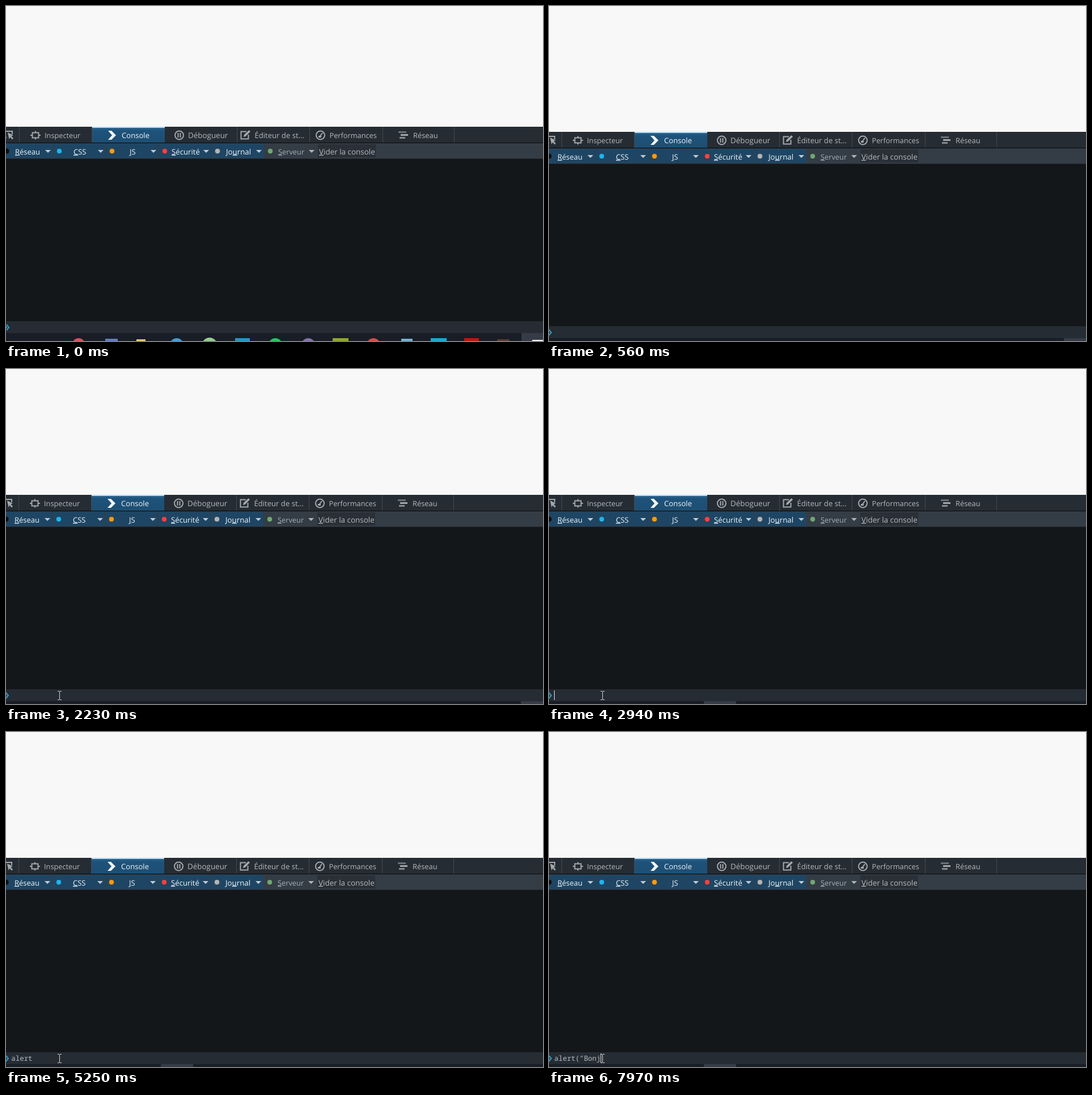
Write an HTML page that moves like this. It is 947 by 591 pixels and loops after 8000 ms.

```html
<!DOCTYPE html>
<html lang="fr">
<head>
<meta charset="utf-8">
<title>Console</title>
<style>
html, body { margin: 0; width: 100%; height: 100%; overflow: hidden; background: #f8f8f8; }
svg { display: block; }
text { font: 13px "Open Sans", "Noto Sans", sans-serif; text-rendering: geometricPrecision; white-space: pre; }
.u { text-decoration: underline; }
#line text { font: 12.417px "Noto Sans Mono", "DejaVu Sans Mono", monospace; }
</style>
</head>
<body>
<svg id="stage" width="947" height="591" viewBox="0 0 947 591">
  <defs>
    <linearGradient id="glow" x1="0" y1="0" x2="0" y2="1">
      <stop offset="0" stop-color="#2a6a96"/>
      <stop offset=".25" stop-color="#1f527a"/>
      <stop offset="1" stop-color="#1d4f73"/>
    </linearGradient>
  </defs>
  <rect width="947" height="591" fill="#f8f8f8"/>
  <g id="panel"></g>
  <rect id="edge" x="946" width="1" height="591" fill="#8b8e91"/>
  <g id="line">
    <text x="9.3" y="580"><tspan id="typed" fill="#b6bcc2"></tspan><tspan id="hint" fill="#6f706b"></tspan></text>
    <rect id="caret" y="567" width="1" height="17" fill="#e4e8ec"/>
  </g>
  <path id="arrow" d="M.5 .5V15.5L4 12.2L6.4 17.5L8.8 16.4L6.5 11.4H11.5Z" fill="#fff" stroke="#000"/>
  <path id="beam" d="M91 568.5H94M95 568.5H98M94.5 569V583M91 583.5H94M95 583.5H98" fill="none" stroke="#d6d8da"/>
</svg>
<script>
const $ = id => document.getElementById(id);
const rect = (x, y, w, h, fill) => `<rect x="${x}" y="${y}" width="${w}" height="${h}" fill="${fill}"/>`;
const path = (d, stroke, width = 2) => `<path d="${d}" fill="none" stroke="${stroke}" stroke-width="${width}"/>`;
const shape = (d, fill) => `<path d="${d}" fill="${fill}"/>`;
const ring = (x, y, r, stroke) => `<circle cx="${x}" cy="${y}" r="${r}" fill="none" stroke="${stroke}" stroke-width="2"/>`;

// "_" marks the underlined letter that follows it
const label = (s, x, y, fill, size = 13) =>
  `<text x="${x}" y="${y}" fill="${fill}" style="font-size:${size}px">` +
  s.replace(/_(.)/, '<tspan class="u">$1</tspan>') + '</text>';

const GREY = '#b4b9be', ICON = '#a3a8ac', WHITE = '#f0f4f7';

function tabs() {
  const names = [['Inspecteur', 67, 12.75], ['Console', 203, 13.1], ['Débogueur', 320, 13.4],
    ['Éditeur de st...', 437.5, 13.1], ['Performances', 569.5, 12.75], ['Réseau', 717, 12.9]];
  return rect(-5, 222, 960, 28, '#252c33') +
    [22, 150, 278, 406, 534, 663, 789].map(x => rect(x, 222, 1, 28, '#42494f')).join('') +
    rect(151, 222, 128, 28, 'url(#glow)') + rect(151, 222, 128, 2, '#b5dcf2') +
    rect(-5, 250, 960, 1, '#07090b') +
    names.map(([s, x, size]) => label(s, x, 241.5, s === 'Console' ? WHITE : GREY, size)).join('');
}

function icons() {
  return path('M-5 230H10V235M-5 241H0', ICON) +
    shape('M2 232L12 237L8.5 238.5L12 242.5L10 244.5L6.5 240.5L4.5 244Z', ICON) +
    path('M45.5 232.5H56.5V241.5H45.5ZM51 229.5V232M51 242V244.5M42 237H45M57 237H60', ICON) +
    shape('M179 229H185L193 237L185 245H179L186 237Z', WHITE) +
    ring(304.5, 237, 7.5, ICON) + path('M302.5 233V241M306.5 233V241', ICON) +
    path('M423 230.5H413.5V243.5H426.5V236', ICON) +
    shape('M418 240L419 236L427.5 228L430 230.5L421.5 239Z', ICON) +
    ring(553.5, 237, 7.5, ICON) + path('M552.5 239L557 233', ICON) +
    shape('M550 238H555V241H550Z', ICON) +
    rect(691, 230, 14, 3, '#6a7076') + rect(695, 235, 13, 3, ICON) + rect(693, 240, 10, 3, '#858b90');
}

function filters() {
  const items = [['_Réseau', 15, '#0b0d0f'], ['_CSS', 118, '#1cb4ee'], ['_JS', 217, '#f59a14'],
    ['_Sécurité', 291, '#ee4345', 13.2], ['Jo_urnal', 387, '#b1b4b7', 13.3], ['_Serveur', 479, '#71a571', 12.8]];
  let out = rect(-5, 251, 960, 28, '#343c45');
  items.forEach(([s, x, dot, size], i) => {
    const on = i < 5, ink = on ? WHITE : '#a4adb6', mid = 73 + 93 * i;
    if (on) out += rect(93 * i - 10, 252, 91.5, 25, '#1e4664');
    out += `<circle cx="${93 * i}" cy="265" r="4.8" fill="${dot}" stroke="#26323c" stroke-width=".8"/>` +
      label(s, x, 270.5, ink, size) +
      shape(`M${mid - 5} 263H${mid + 5}L${mid} 268Z`, on ? '#c3ccd3' : '#b0b5ba');
  });
  return out + rect(549, 253, 102, 23, '#2a3037') + label('_Vider la console', 551, 270.5, GREY, 13.45);
}

function taskbar() {
  // centre, half width, top, colour, round
  const apps = [[127, 11, 595, '#d9515c', 1], [185, 11, 596, '#5f7cc8'], [237, 8, 597, '#e8cc62'],
    [300, 12, 595, '#3aa0dc', 1], [358, 13, 594, '#93cf8c', 1], [416, 13, 595, '#2595c4'],
    [474, 12, 595, '#22c95c', 1], [532, 12, 595, '#866fae', 1], [589, 14, 595, '#90a62c'],
    [647, 12, 595, '#d54a40', 1], [706, 10, 596, '#70b4d6'], [762, 14, 595, '#1aa9d0'],
    [820, 13, 595, '#c01418'], [876, 11, 597, '#5c3d30']];
  return rect(-5, 586, 960, 30, '#181d26') +
    '<rect id="focus" y="586" height="30" fill="#353c47"/>' +
    apps.map(([x, r, y, c, round]) => round
      ? `<circle cx="${x}" cy="${y + r}" r="${r}" fill="${c}"/>`
      : rect(x - r, y, 2 * r, 2 * r, c)).join('') +
    rect(927, 598, 20, 12, '#f4f4f4');
}

$('panel').innerHTML = tabs() + icons() + filters() +
  rect(-5, 278, 960, 1, '#20262c') + rect(-5, 279, 960, 286, '#14171a') +
  rect(-5, 565, 960, 21, '#252c33') +
  path('M0 571L4 576L0 581M-4 571L0 576L-4 581', '#3aa5d8', 1.8) + taskbar();

// Each track: [start ms, ...values], held until the next start
const SHIFT = [[0, 1, -9], [410, 2, -4], [560, 0, 0]];
const MOUSE = [[0, ''], [1410, 'arrow', 318, 10], [1560, 'arrow', 69, 334], [1680, 'arrow', 86, 422],
  [1800, 'arrow', 90, 534], [1950, 'beam', 0, 1], [2080, 'beam', 0, -1], [2230, 'beam', 0, 0]];
const INPUT = [[0, '', '', 0], [2940, '', '', 1], [3500, '', '', 0],
  [3930, 'a', 'ddEventListener', 1], [4050, 'al', 'ert', 1], [4170, 'ale', 'rt', 1],
  [4450, 'aler', 't', 1], [4730, 'alert', '', 1], [5250, 'alert', '', 0], [5780, 'alert', '', 1],
  [6340, 'alert', '', 0], [6460, 'alert("', '', 1], [7020, 'alert("', '', 0], [7140, 'alert("B', '', 1],
  [7570, 'alert("Bo', '', 1], [7700, 'alert("Bon', '', 1], [7970, 'alert("Bonj', '', 1]];
const LOOP = 8000;

const at = (track, t) => track.filter(step => step[0] <= t).pop().slice(1);
const show = (el, on) => el.setAttribute('visibility', on ? 'visible' : 'hidden');

function draw(t) {
  const [dx, dy] = at(SHIFT, t);
  $('panel').setAttribute('transform', `translate(${dx} ${dy})`);
  show($('edge'), t >= 410 && t < 560);

  const active = t >= 2940;
  $('focus').setAttribute('x', active ? 273 : 908);
  $('focus').setAttribute('width', active ? 57 : 45);

  const [typed, hint, caret] = at(INPUT, t);
  $('typed').textContent = typed;
  $('hint').textContent = hint;
  $('caret').setAttribute('x', Math.round(9.3 + 7.45 * typed.length));
  show($('caret'), caret);

  const [kind, x, y] = at(MOUSE, t);
  for (const id of ['arrow', 'beam']) {
    show($(id), id === kind);
    if (id === kind) $(id).setAttribute('transform', `translate(${x} ${y})`);
  }
}

const start = performance.now();
function tick() {
  draw((performance.now() - start) % LOOP);
  requestAnimationFrame(tick);
}
tick();
</script>
</body>
</html>
```
